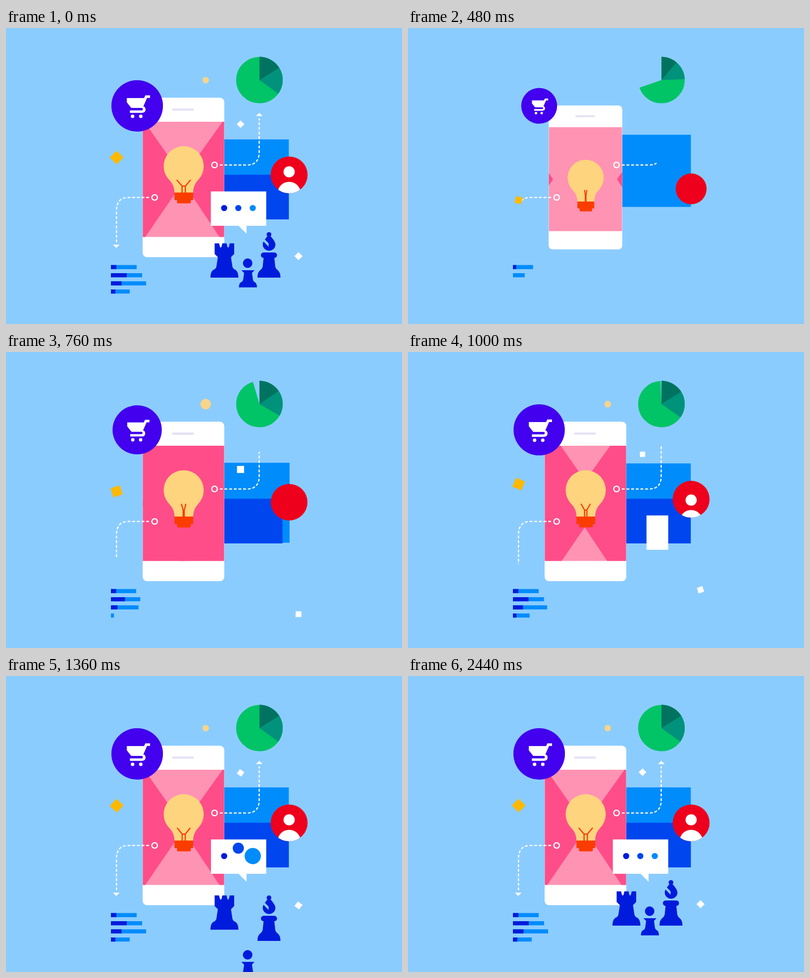
Animation of 800x600 px, one loop 3 s. Source, as an HTML page:

```html
<!DOCTYPE html>
<html lang="en">
<head>
<meta charset="utf-8">
<title>Mobile ideas</title>
<style>
html, body { margin: 0; height: 100%; overflow: hidden; background: #8bccff; }
svg { display: block; width: 100vw; height: 100vh; }
.c { transform-box: fill-box; transform-origin: center; }
.l { transform-box: fill-box; transform-origin: left; }
.r { transform-box: fill-box; transform-origin: right; }
.t { transform-box: fill-box; transform-origin: top; }
.phone { transform-origin: 358.5px 303px; }
.red { transform-origin: 572px 297.7px; }
.pie circle { fill: none; stroke-width: 47; }
.dash { fill: none; stroke: #fff; stroke-width: 2.4; stroke-linecap: round; stroke-dasharray: 3.8 5.6; }
.trim { fill: none; stroke: #fff; stroke-width: 8; stroke-dasharray: 1 2; }
.ring { fill: none; stroke: #fff; stroke-width: 2.5; }
.white { fill: #fff; }
.navy { fill: #001bdc; }
.blue { fill: #0046ee; }
.sky { fill: #008cfb; }
.hot { fill: #ff4d89; }
</style>
</head>
<body>
<svg viewBox="0 0 800 600">
  <defs>
    <clipPath id="screen"><rect x="276.5" y="190" width="164" height="233.5"/></clipPath>
    <clipPath id="badge"><circle cx="572" cy="297.7" r="37.3"/></clipPath>
    <path id="routeR" pathLength="1" d="M431 277.7H487Q511.5 277.7 511.5 251V183"/>
    <path id="routeL" pathLength="1" d="M291 343.5H247Q223.2 343.5 223.2 371V434"/>
    <mask id="maskR" maskUnits="userSpaceOnUse" x="0" y="0" width="800" height="600"><use href="#routeR" class="trim" id="trimR"/></mask>
    <mask id="maskL" maskUnits="userSpaceOnUse" x="0" y="0" width="800" height="600"><use href="#routeL" class="trim" id="trimL"/></mask>
  </defs>

  <rect id="panel" class="phone sky" x="340" y="225.8" width="231.3" height="162.2"/>
  <rect id="panelLow" class="l blue" x="441" y="297.5" width="130.3" height="90.5"/>

  <g id="phone" class="phone">
    <rect class="white" x="276" y="141.2" width="165" height="323.4" rx="9"/>
    <rect x="335.5" y="163.2" width="44" height="4.4" rx="2" fill="#e3e1f5"/>
    <g clip-path="url(#screen)">
      <rect x="276" y="190" width="165" height="234" fill="#ff93b3"/>
      <path id="wedgeL" class="hot" d="M100 190H279.5L361 307L281 424H100Z"/>
      <path id="wedgeR" class="hot" d="M620 190H437.5L354 307L431.5 424H620Z"/>
      <g id="bulb">
        <path fill="#fed47e" d="M340.5 334.5Q340.5 319 331 309.3A40.5 40.5 0 1 1 387 309.3Q378 319 378 334.5Z"/>
        <path id="wire" fill="none" stroke="#fa3c00" stroke-width="2.4" stroke-linecap="round"/>
        <path fill="#fa3c00" d="M340.3 333.5H378.2V347.5Q378.2 349 376.5 349H373.3V353.5Q373.3 355.6 371 355.6H348Q345.5 355.6 345.5 353.5V349H342Q340.3 349 340.3 347.5Z"/>
      </g>
    </g>
  </g>

  <g id="shop" class="c">
    <circle cx="265" cy="157.8" r="52.1" fill="#4200ee"/>
    <g class="white">
      <path d="M244 142H279L281.5 136.5H291V141.8H285L277.5 158.8Q282 160.5 282 165Q282 172 274.5 172H250.3V167H274Q276.5 167 276.5 164.5Q276.5 162 274 162H253L244 150.5Z"/>
      <circle cx="255.7" cy="179" r="3.6"/>
      <circle cx="272.3" cy="179" r="3.6"/>
    </g>
  </g>

  <g class="pie" transform="rotate(-90 512 105.6)">
    <circle id="pie1" cx="512" cy="105.6" r="23.5" pathLength="360" stroke="#00c466"/>
    <circle id="pie2" cx="512" cy="105.6" r="23.5" pathLength="360" stroke="#00927b"/>
    <circle id="pie3" cx="512" cy="105.6" r="23.5" pathLength="360" stroke="#007360"/>
  </g>

  <g id="red" class="red">
    <circle cx="572" cy="297.7" r="37.3" fill="#ee001c"/>
    <g clip-path="url(#badge)">
      <g id="person" class="white">
        <circle cx="572" cy="291.5" r="11.3"/>
        <circle cx="572" cy="335" r="23.3"/>
      </g>
    </g>
  </g>

  <g mask="url(#maskR)"><path class="dash" d="M433 277.7H487Q511.5 277.7 511.5 251V183"/></g>
  <g mask="url(#maskL)"><path class="dash" d="M288 343.5H247Q223.2 343.5 223.2 371V434"/></g>
  <circle id="ringR" class="c ring" cx="421.3" cy="277.6" r="5.6"/>
  <circle id="ringL" class="c ring" cx="300.3" cy="343.5" r="5.6"/>
  <path id="tipR" class="c white" d="M505 178.4H518.5L511.7 172Z"/>
  <path id="tipL" class="c white" d="M216 439.2H229.5L222.7 445.8Z"/>

  <g id="bars"></g>

  <rect id="gold" class="c" x="213.7" y="252.7" width="19.6" height="19.6" fill="#ffb900"/>
  <rect id="gem1" class="c white" x="468.4" y="189.5" width="10.9" height="10.9"/>
  <rect id="gem2" class="c white" x="585.1" y="456.6" width="11.7" height="11.7"/>
  <circle id="sun" class="c" cx="403.5" cy="105.7" r="6.5" fill="#f9d48b"/>

  <path id="tail" class="t white" d="M469.5 400.5H486V417Z"/>
  <rect id="bubble" class="r white" x="413.8" y="331.3" width="111.9" height="69.6"/>
  <circle id="dot0" class="c navy" cx="440.7" cy="365" r="6.2"/>
  <circle id="dot1" class="c blue" cx="469.3" cy="365" r="6.2"/>
  <circle id="dot2" class="c sky" cx="498.5" cy="365" r="6.2"/>

  <g class="navy">
    <path id="rook" d="M421.5 436.5H430.5L432 443Q433.8 447 435.5 443L437 436.5H445.5L447 443Q448.8 447 450.5 443L452 436.5H461V458L454.5 464.5L457.5 484Q458.5 488 464 490.5Q469.5 494.5 469.5 506H413Q413 494.5 418.5 490.5Q424 488 425 484L428 464.5L421.5 458Z"/>
    <g id="pawn">
      <circle cx="488.2" cy="476.7" r="9.6"/>
      <path d="M475.5 491H502L497 496.5L499 511Q500 514 503 515.5Q507 518 507 525.7H470.5Q470.5 518 474.5 515.5Q478 514 479 511L481 496.5Z"/>
    </g>
    <g id="bishop">
      <circle cx="531.3" cy="418.5" r="4.8"/>
      <path d="M527.5 422.5H535Q544.3 433 544.3 439A12.8 12.4 0 0 1 518.7 439Q518.7 435.5 520.3 432.8L530.5 443.5V436.5L523 428.8Z"/>
      <rect x="515" y="455" width="32.5" height="11" rx="5.5"/>
      <path d="M520.5 465H542L544 484Q545 488 549 491Q554.5 495 554.5 506H508Q508 495 513.5 491Q517.5 488 518.5 484Z"/>
    </g>
  </g>
</svg>
<script>
const LOOP = 3000, RESET = 120, STEP = 40;
const EXPO = 'cubic-bezier(.16,1,.3,1)', CUBIC = 'cubic-bezier(.33,1,.68,1)';
const $ = id => document.getElementById(id);
const anims = [];

// stops: [time, value] pairs; the first value holds from RESET, the last until the loop ends
function run(id, prop, stops, easing = 'linear') {
  const all = [[RESET, stops[0][1]], ...stops, [LOOP + RESET, stops[stops.length - 1][1]]];
  const frames = all.map(([t, v]) => ({ offset: (t - RESET) / LOOP, [prop]: v, easing }));
  const a = $(id).animate(frames, { duration: LOOP, iterations: Infinity });
  a.pause();
  anims.push(a);
}
const go = (id, prop, from, to, start, length, easing = EXPO) =>
  run(id, prop, [[start, from], [start + length, to]], easing);
const rise = (id, dist, start, length, easing) =>
  go(id, 'translate', `0px ${dist}px`, '0px 0px', start, length, easing);
const grow = (id, start, length) => go(id, 'scale', '0', '1', start, length);

// phone and panels
grow('phone', 300, 542);
rise('bulb', 240, 300, 542);
grow('panel', 300, 542);
run('panel', 'translate', [[300, '0px 0px'], [480, '21px -17px'], [842, '0px 0px']], 'ease-out');
go('panelLow', 'scale', '0 1', '1 1', 580, 540);

// screen wedges sweep in, overlap, then part
const sweep = [[400, -95], [480, -75], [620, 82], [760, 80], [880, 52], [1000, 29], [1120, 12], [1240, 3], [1360, 0]];
run('wedgeL', 'translate', sweep.map(([t, d]) => [t, `${d}px 0px`]));
run('wedgeR', 'translate', sweep.map(([t, d]) => [t, `${-d}px 0px`]));

// filament opens
const wire = (top, stem) => `path("M${359 - stem} 334L${359 - stem} 320.5L${359 - top} 308.5` +
  `M${359 + stem} 334L${359 + stem} 320.5L${359 + top} 308.5M${359 - stem} 320.5L${359 + stem} 320.5")`;
run('wire', 'd', [[480, wire(2.3, .7)], [760, wire(4.3, 1.1)], [1000, wire(9, 2.3)],
  [1360, wire(12.8, 3.1)], [1560, wire(13.5, 3.3)]]);

// badges and pie
grow('shop', 300, 1050);
[['pie1', 360], ['pie2', 126], ['pie3', 58]].forEach(([id, deg]) =>
  go(id, 'strokeDasharray', '0 360', `${deg} 360`, 300, 1050));
grow('red', 300, 690);
rise('red', 55, 300, 910, CUBIC);
rise('person', 62, 760, 480, CUBIC);

// dashed routes
for (const side of ['R', 'L']) {
  grow('ring' + side, 300, 300);
  go('trim' + side, 'strokeDashoffset', '1', '0', 375, 1250);
  grow('tip' + side, 1080, 260);
}

// bar rows: total, dark part, start time
[[52, 11, 295], [63, 32, 420], [71, 21.5, 573], [38, 9, 737]].forEach(([total, dark, start], i) => {
  [[total, 'sky', 0], [dark, 'navy', 70]].forEach(([w, tone, lag]) => {
    const bar = document.createElementNS('http://www.w3.org/2000/svg', 'rect');
    const box = { id: tone + i, class: 'l ' + tone, x: 212, y: 480.5 + i * 16.5, width: w, height: 8.3 };
    for (const k in box) bar.setAttribute(k, box[k]);
    $('bars').append(bar);
    go(bar.id, 'scale', '0 1', '1 1', start + lag, 850);
  });
});

// confetti
const spin = (id, turn, start, length) => go(id, 'rotate', `${45 - turn}deg`, '45deg', start, length);
rise('gold', 217, 300, 1350);
spin('gold', 440, 300, 1650);
run('gold', 'scale', [[300, '0'], [480, '.7'], [580, '1.26'], [660, '1.15'], [760, '1']]);
rise('gem1', 165, 500, 1350);
spin('gem1', 405, 500, 1650);
run('gem1', 'scale', [[500, '0'], [640, '1.2'], [700, '1.4'], [760, '1.32'], [960, '.96'], [1100, '1']]);
rise('gem2', 140, 620, 1350);
spin('gem2', 455, 620, 1350);
run('gem2', 'scale', [[620, '0'], [760, '1'], [840, '1.25'], [1000, '1']]);
run('sun', 'scale', [[560, '0'], [680, '1.75'], [760, '1.64'], [880, '1.2'], [1000, '1.03'], [1100, '1']]);

// speech bubble and its hopping dots
go('bubble', 'scale', '0 1', '1 1', 960, 540);
grow('tail', 1120, 300);
for (let i = 0; i < 3; i++) {
  const s = 1120 + i * 80;
  run('dot' + i, 'scale', [[s, '0'], [s + 80, '2.65'], [s + 160, '1.82'], [s + 240, '1']]);
  run('dot' + i, 'translate', [[s + 80, 0], [s + 160, -16], [s + 240, 0], [s + 320, 4], [s + 400, -1.5], [s + 500, 0]]
    .map(([t, y]) => [t, `0px ${y}px`]));
}

// chess pieces
rise('rook', 170, 1128, 540);
rise('bishop', 190, 1220, 540);
rise('pawn', 140, 1323, 540);

function tick() {
  const t = Math.floor(performance.now() / STEP) * STEP;
  for (const a of anims) a.currentTime = t + LOOP - RESET;
  requestAnimationFrame(tick);
}
tick();
</script>
</body>
</html>
```
